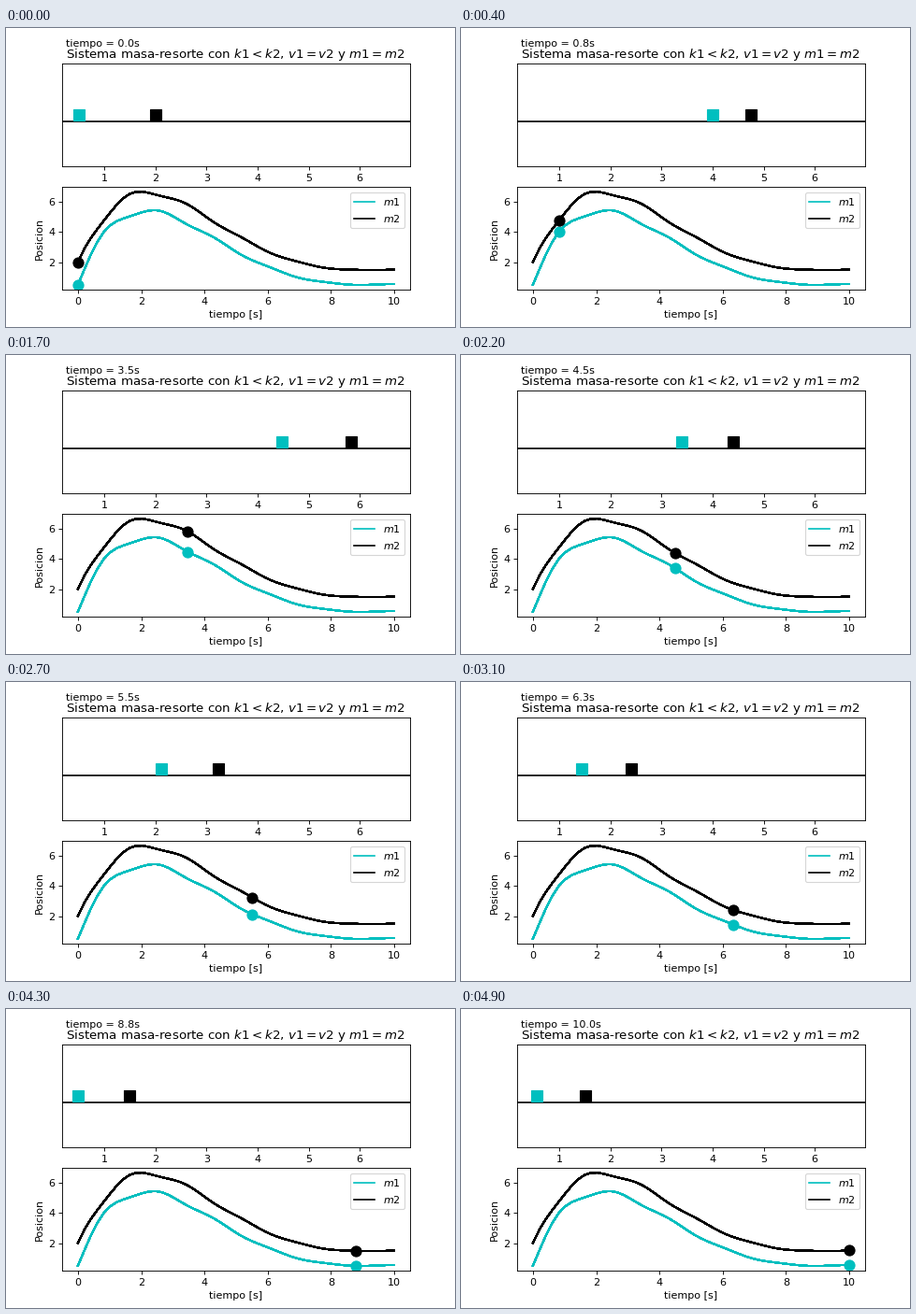
These frames come from a looping animation (480x320 px, 5000 ms). A matplotlib script:

```python
import numpy as np
import matplotlib.pyplot as plt
from matplotlib.animation import FuncAnimation

FRAMES, INTERVAL = 50, 100
COLORS = ("c", "k")
OVERDRAW = 50  # stacked strokes harden the edges of the curves

# Two equal damped masses in a chain of springs
m, b, k1, k2 = 1.6, 1.0, 1.0, 10.0
rest = np.array([1.0, 2.0])
start = np.array([0.5, 2.0])
speed = 5.0


def solve(times):
    """Positions of both masses, from the modes of the linear system."""
    stiffness = np.array([[k1 + k2, -k2], [-k2, k2]]) / m
    system = np.block([[np.zeros((2, 2)), np.eye(2)],
                       [-stiffness, -b / m * np.eye(2)]])
    rates, modes = np.linalg.eig(system)
    state = np.concatenate([start - rest, [speed, speed]])
    weights = np.linalg.solve(modes, state.astype(complex))
    states = (modes * weights) @ np.exp(np.outer(rates, times))
    return states[:2].real + rest[:, None]


t = np.linspace(0, 10, FRAMES)
positions = solve(t)
low, high = positions.min(), positions.max()
margin = 0.05 * (high - low)
limits = (low - margin, high + margin)

plt.rcParams.update({"font.family": "DejaVu Sans", "font.size": 10})
fig, (track, graph) = plt.subplots(2, 1, figsize=(6, 4), dpi=80)
fig.subplots_adjust(left=0.125, right=0.9, bottom=0.125, top=0.88, hspace=0.2)

track.set_title("Sistema masa-resorte con $k1<k2$, $v1=v2$ y $m1=m2$",
                fontsize=12)
track.set(xlim=limits, ylim=(-0.055, 0.055), xticks=range(1, 7), yticks=[])
track.axhline(-0.0065, color="k", lw=1.5)
clock = track.text(0.01, 1.167, "", transform=track.transAxes)

for color, x, name in zip(COLORS, positions, ("$m1$", "$m2$")):
    graph.plot(t, x, color=color, lw=1.5, label=name)
    for _ in range(OVERDRAW - 1):
        graph.plot(t, x, color=color, lw=1.5)
graph.set(xlim=(-0.5, 10.5), ylim=limits, xticks=range(0, 11, 2),
          yticks=[2, 4, 6], xlabel="tiempo [s]", ylabel="Posicion")
graph.legend(loc="upper right")

blocks = [track.plot([], [], "s", color=c, ms=10)[0] for c in COLORS]
dots = [graph.plot([], [], "o", color=c, ms=10)[0] for c in COLORS]


def update(i):
    for block, dot, x in zip(blocks, dots, positions[:, i]):
        block.set_data([x], [0])
        dot.set_data([t[i]], [x])
    clock.set_text(f"tiempo = {t[i]:.1f}s")
    return [*blocks, *dots, clock]


anim = FuncAnimation(fig, update, frames=FRAMES, interval=INTERVAL,
                     repeat=True, repeat_delay=0)
plt.show()
```
